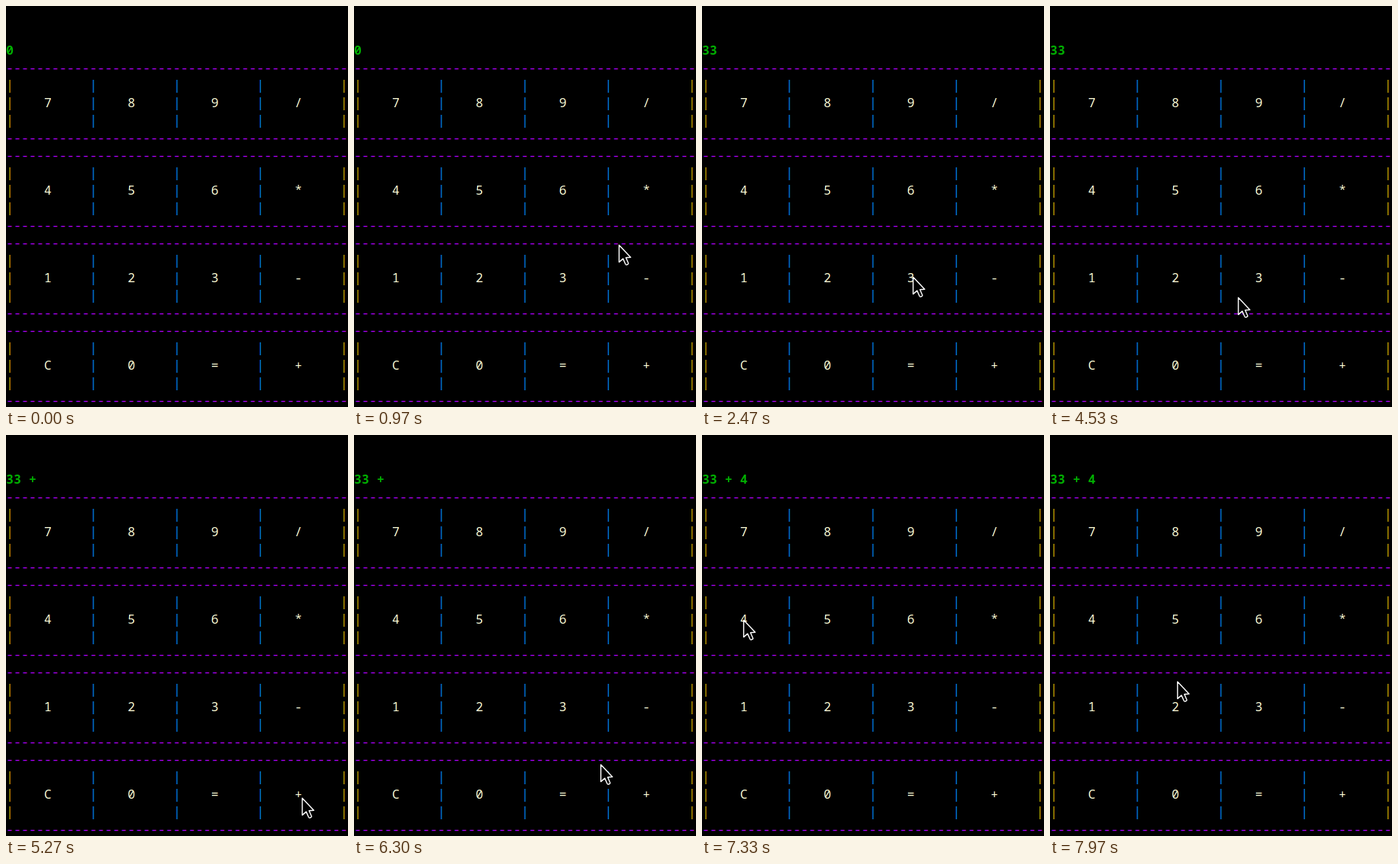
An HTML page that plays this animation: 450x527 px, repeating every 8000 ms.

```html
<!DOCTYPE html>
<html lang="en">
<head>
<meta charset="utf-8">
<title>Terminal calculator</title>
<style>
  html, body { margin: 0; width: 100%; height: 100%; overflow: hidden; background: #000; }
  pre {
    position: absolute; inset: 0; margin: 0; padding-top: 46px; overflow: hidden;
    color: #ffffd7; background: #000; filter: url(#subpixel);
    font: 16.6667px/23px "Noto Sans Mono", monospace;
    font-variant-ligatures: none;
  }
  #display { color: #00af00; font-weight: 700; }
  .rule { color: #af00ff; }
  .edge { color: #d7af00; }
  .bar { color: #0087ff; }
  svg { position: absolute; left: 0; top: 0; overflow: visible; }
</style>
</head>
<body>
<pre><span id="display">0</span>
<span id="keypad"></span></pre>
<svg width="0" height="0">
  <!-- LCD-style text: red and blue are sampled a third of a pixel to either side -->
  <filter id="subpixel" x="0" y="0" width="1" height="1" color-interpolation-filters="sRGB">
    <feConvolveMatrix in="SourceGraphic" order="3 1" kernelMatrix="-.11 .89 .22" divisor="1" preserveAlpha="true"/>
    <feColorMatrix values="1 0 0 0 0  0 0 0 0 0  0 0 0 0 0  0 0 0 1 0" result="red"/>
    <feColorMatrix in="SourceGraphic" values="0 0 0 0 0  0 1 0 0 0  0 0 0 0 0  0 0 0 1 0" result="green"/>
    <feConvolveMatrix in="SourceGraphic" order="3 1" kernelMatrix=".22 .89 -.11" divisor="1" preserveAlpha="true"/>
    <feColorMatrix values="0 0 0 0 0  0 0 0 0 0  0 0 1 0 0  0 0 0 1 0" result="blue"/>
    <feBlend in="red" in2="green" mode="screen"/>
    <feBlend in2="blue" mode="screen"/>
  </filter>
</svg>
<svg id="cursor" width="17" height="28">
  <path d="M.8 1.2V23.6L6 19.1 9.2 26.3Q9.8 27.5 11 27L12.3 26.4Q13.4 25.8 12.9 24.7L9.8 17.8 16 17.2Z"
        fill="#000" stroke="#fff" stroke-width="1.4" stroke-linejoin="round"/>
</svg>
<script>
const LOOP = 8000;

const smooth = u => u * u * (3 - 2 * u);
const easeOut = u => 1 - (1 - u) ** 3;

// What the display shows from a given time on.
const entries = [[0, "0"], [1970, " "], [2030, "3"], [2470, "33"], [5270, "33 +"], [7330, "33 + 4"]];

// Strokes of the hand: each runs on from the last one; bow bends it off the straight line.
const home = { x: 215, y: -28 };
const strokes = [
  { from: 430, until: 630, x: 320, y: 248 },
  { from: 800, until: 1570, x: 280, y: 354, bow: [105, 8], ease: easeOut },
  { from: 1700, until: 1730, x: 277, y: 355 },
  { from: 3630, until: 3870, x: 245, y: 380 },
  { from: 4530, until: 5030, x: 389, y: 476, bow: [0, 60] },
  { from: 6170, until: 6700, x: 77, y: 264 },
  { from: 6830, until: 6970, x: 64, y: 248 },
  { from: 7000, until: 7170, x: 54, y: 242 },
  { from: 7670, until: 7970, x: 167, y: 323 }
];

const paint = (name, text) => `<span class="${name}">${text}</span>`;

function keyRow(keys) {
  const line = labels => paint("edge", "|") +
    [...labels].map(c => `    ${c}     `).join(paint("bar", "|")) + paint("edge", "|");
  const rule = paint("rule", "-".repeat(45));
  const blank = line("    ");
  return [rule, blank, line(keys), blank, rule].join("\n");
}

const display = document.getElementById("display");
const cursor = document.getElementById("cursor");
document.getElementById("keypad").innerHTML = ["789/", "456*", "123-", "C0=+"].map(keyRow).join("\n");

// 30 steps a second; the small lead absorbs times rounded to 10 ms.
const tickOf = ms => Math.floor((ms + 4) * 0.03);

function pointerAt(ms) {
  let at = home;
  for (const { from, until, x, y, bow = [0, 0], ease = smooth } of strokes) {
    const first = tickOf(from), last = tickOf(until);
    const step = tickOf(ms) - first + 1;
    if (step <= 0) break;
    const e = ease(Math.min(1, step / (last - first + 1)));
    const bend = 2 * e * (1 - e);
    at = { x: at.x + (x - at.x) * e + bow[0] * bend, y: at.y + (y - at.y) * e + bow[1] * bend };
  }
  return at;
}

function draw(ms) {
  const text = entries.filter(([at]) => at <= ms).pop()[1];
  if (display.textContent !== text) display.textContent = text;
  const { x, y } = pointerAt(ms);
  cursor.style.transform = `translate(${Math.round(x)}px, ${Math.round(y)}px)`;
}

const start = performance.now();
function frame() {
  draw((performance.now() - start) % LOOP);
  requestAnimationFrame(frame);
}
frame();
</script>
</body>
</html>
```
